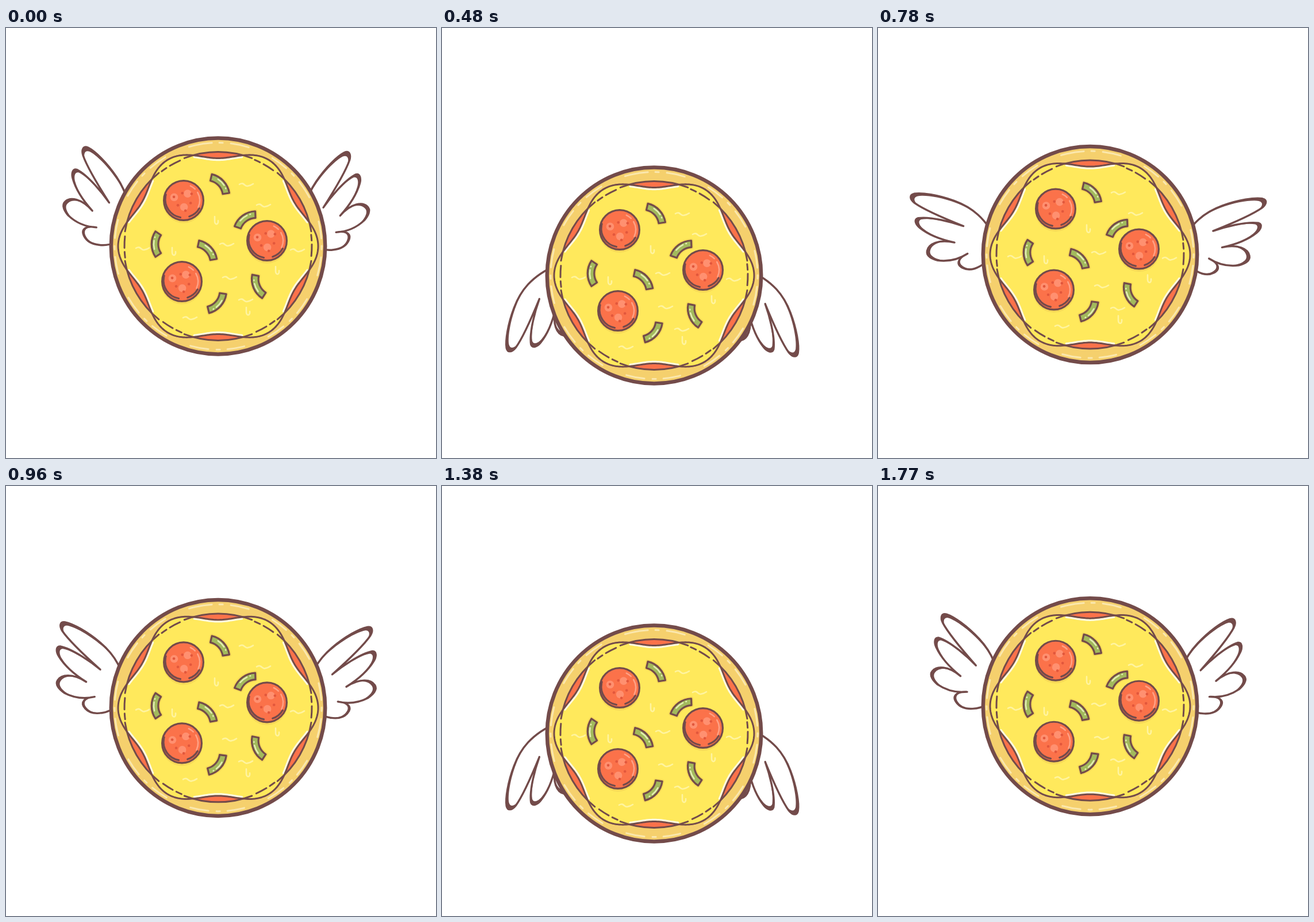
An HTML page with a canvas that plays this animation: 748 px wide and 748 px high, repeating every 1800 ms.

```html
<!DOCTYPE html>
<html>
<head>
<meta charset="utf-8">
<title>Flying pizza</title>
<style>
html, body { margin: 0; width: 100%; height: 100%; overflow: hidden; background: #fff; }
canvas { display: block; width: 748px; height: 748px; }
</style>
</head>
<body>
<canvas id="stage" width="748" height="748"></canvas>
<script>
const ctx = document.getElementById('stage').getContext('2d');
const BROWN = '#734b4a', CRUST = '#f5d06d', CREAM = '#fbe8ae', SAUCE = '#fb724a';
const CHEESE = '#ffe95c', PALE = '#fff4a0', SHADE = '#f6d957', GREEN = '#a2ba5c';
const RAD = Math.PI / 180, CX = 369, CY = 379.5, SAUCE_R = 164;
const PERIOD = 900, DOWN = 480, DROP = 51, SWING = 125.2;

// Wing in its level pose, turning about the hinge
const HINGE = { x: 204.6, y: 390.2 };
const wing = new Path2D(`M206 385 C168 353 135 349 105 352.5 C75 356 48 365 37 373
  C30 379 35 385 45 387 C65 390 100 388 139 384.5 C120 387 80 395 62 408
  C56 414 65 420 73 421.5 C92 425.5 115 423 138 417 C110 424 99 440 102 451
  C104 461 117 460 126 458 C143 452 157 441 167 424 C156 438 156 450 171 450
  C182 450 190 443 196 434 C202 426 205 415 206 405 Z`);

// centre and direction of the bulge in degrees
const peppers = [[374, 270, -43], [415, 331, -126], [259, 376, 180],
  [352, 385, -44], [369, 480, 42], [436, 450, 157]];
const salami = [[309, 300], [454, 370], [306, 441]];
const ripples = [[418, 272], [448, 308], [384, 376], [389, 434],
  [320, 504], [507, 386], [417, 473], [238, 383]];
const drips = [[363, 328], [289, 382], [469, 415], [418, 486]];

function pen(color, width, cap = 'round') {
  ctx.strokeStyle = color;
  ctx.lineWidth = width;
  ctx.lineCap = cap;
  ctx.lineJoin = 'round';
}

function disc(x, y, r, fill) {
  ctx.beginPath();
  ctx.arc(x, y, r, 0, 7);
  ctx.fillStyle = fill;
  ctx.fill();
}

function arc(x, y, r, from, to) {
  ctx.beginPath();
  ctx.arc(x, y, r, from * RAD, to * RAD);
  ctx.stroke();
}

// Edge of the cheese: six lobes around the centre
function rim(from, to, inset = 0) {
  ctx.beginPath();
  for (let a = from; a <= to; a++) {
    const r = 163.5 + 10.5 * Math.cos(6 * a * RAD) - inset;
    ctx.lineTo(CX + r * Math.cos(a * RAD), CY + r * Math.sin(a * RAD));
  }
}

function drawWing(d, right) {
  ctx.save();
  if (right) {
    ctx.translate(731.5, 8.5);
    ctx.scale(-1, 1);
  }
  ctx.translate(HINGE.x, HINGE.y + DROP * (d - 0.5));
  ctx.rotate((0.5 - d) * SWING * RAD);
  ctx.save();
  ctx.translate(-HINGE.x, -HINGE.y);
  ctx.fillStyle = BROWN;
  ctx.fill(wing);
  ctx.restore();
  // a slightly smaller white copy leaves the tips thick
  ctx.save();
  ctx.scale(0.955, 0.955);
  ctx.translate(-HINGE.x, -HINGE.y);
  ctx.fillStyle = '#fff';
  ctx.fill(wing);
  ctx.restore();
  ctx.translate(-HINGE.x, -HINGE.y);
  pen(BROWN, 3.4);
  ctx.stroke(wing);
  ctx.restore();
}

function drawBase() {
  ctx.beginPath();
  ctx.ellipse(CX, CY, 186.2, 188, 0, 0, 7);
  ctx.fillStyle = CRUST;
  ctx.fill();
  pen(BROWN, 6.5);
  ctx.stroke();
  pen(CREAM, 3);
  ctx.setLineDash([30, 13, 6, 14, 32, 45]);
  arc(CX, CY, 180, -103, 257);
  ctx.setLineDash([]);
  disc(CX, CY, SAUCE_R, SAUCE);

  rim(0, 360);
  ctx.fillStyle = CHEESE;
  ctx.fill();
  pen('#fffbe0', 3.5);
  for (let a = 30; a < 390; a += 60) {
    rim(a - 15, a + 15, 3);
    ctx.stroke();
  }
  pen(BROWN, 3);
  rim(0, 360);
  ctx.stroke();
  for (let a = 30; a < 390; a += 60) {
    arc(CX, CY, SAUCE_R, a - 21, a + 21);
    ctx.setLineDash([10, 7, 30]);
    arc(CX, CY, SAUCE_R - 1, a + 23, a + 36);
    ctx.setLineDash([]);
  }
}

function drawRipples() {
  pen(PALE, 2.6);
  for (const [x, y] of ripples) {
    ctx.beginPath();
    ctx.moveTo(x - 12, y);
    ctx.bezierCurveTo(x - 4, y - 5, x - 3, y + 4, x + 2, y + 3);
    ctx.quadraticCurveTo(x + 8, y + 2, x + 12, y - 1);
    ctx.stroke();
  }
  for (const [x, y] of drips) {
    ctx.beginPath();
    ctx.moveTo(x, y);
    ctx.lineTo(x, y + 8);
    ctx.bezierCurveTo(x, y + 15, x + 7, y + 15, x + 6, y + 7);
    ctx.stroke();
  }
}

function drawSalami([x, y]) {
  disc(x, y + 4, 35.5, SHADE);
  disc(x, y, 34.5, SAUCE);
  for (let i = 0; i < 3; i++) {
    const a = (75 + i * 120) * RAD;
    disc(x - 3 + 14 * Math.cos(a), y - 2 + 14 * Math.sin(a), 6.8, '#ff9070');
  }
  for (let i = 0; i < 6; i++) {
    const a = (20 + i * 60) * RAD, r = i % 2 ? 18 : 13;
    disc(x + r * Math.cos(a), y + r * Math.sin(a), 2.3, '#e2573c');
  }
  pen('#ffa184', 2.6);
  arc(x, y, 28, -30, 25);
  arc(x, y, 28, -65, -45);
  pen(BROWN, 3.2);
  arc(x, y, 34.4, 0, 360);
  arc(x, y - 2, 32, 100, 195);
  arc(x, y - 2, 31.5, 30, 72);
}

function drawPepper([x, y, turn]) {
  const R = 34, HALF = 5.8, bend = 34 * RAD;
  ctx.save();
  ctx.translate(x, y);
  ctx.rotate(turn * RAD);
  ctx.translate(-R, 0);
  ctx.beginPath();
  ctx.arc(0, 0, R + HALF, -bend, bend);
  ctx.arc(0, 0, R - HALF, bend, -bend, true);
  ctx.closePath();
  pen(SHADE, 7);
  ctx.stroke();
  ctx.fillStyle = GREEN;
  ctx.fill();
  pen(BROWN, 3.2);
  ctx.stroke();
  pen('#e3ecb4', 2.6);
  arc(0, 0, R + 2, -14, 10);
  arc(0, 0, R + 2, 19, 20);
  ctx.restore();
}

function draw(now) {
  const t = Math.floor(now / 30) * 30 % PERIOD;
  const d = t < DOWN ? t / DOWN : (PERIOD - t) / (PERIOD - DOWN);
  ctx.fillStyle = '#fff';
  ctx.fillRect(0, 0, 748, 748);
  drawWing(d, false);
  drawWing(d, true);
  ctx.save();
  ctx.translate(0, DROP * d);
  drawBase();
  drawRipples();
  peppers.forEach(drawPepper);
  salami.forEach(drawSalami);
  ctx.restore();
}

let start;
function tick(now) {
  start ??= now;
  draw(now - start);
  requestAnimationFrame(tick);
}
draw(0);
requestAnimationFrame(tick);
</script>
</body>
</html>
```
